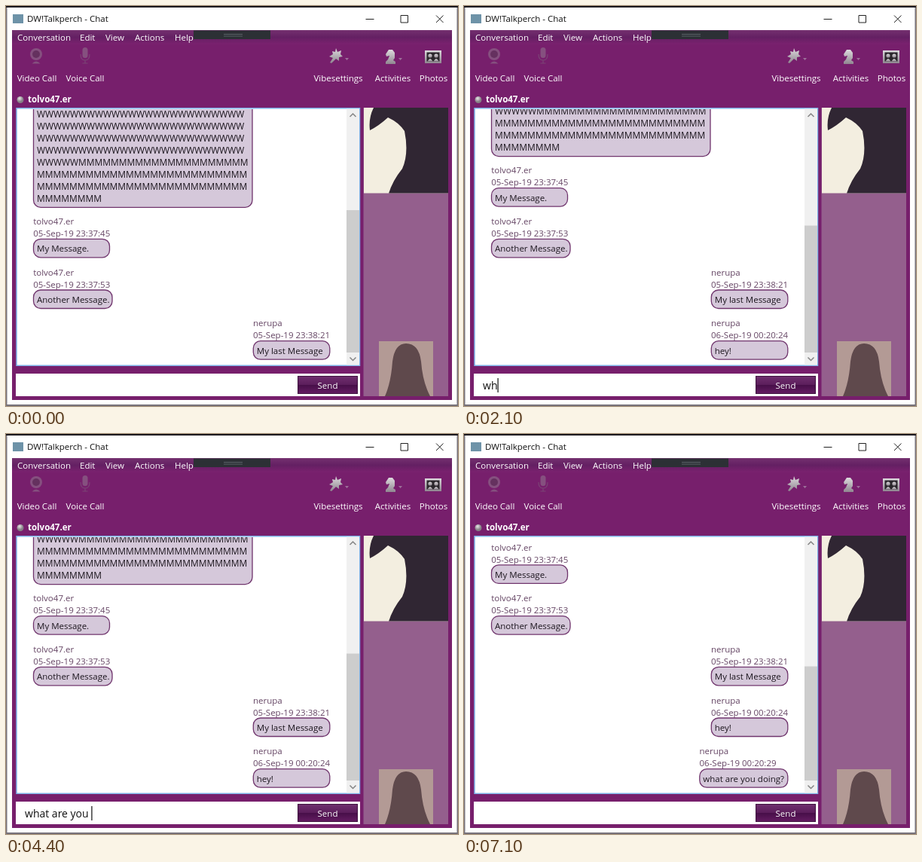
An HTML page for the animation above (7200 ms loop, 600 by 531 pixels).

```html
<!DOCTYPE html>
<html lang="en">
<head>
<meta charset="utf-8">
<title>Chat</title>
<style>
  html, body { margin: 0; width: 100%; height: 100%; overflow: hidden; }
  svg { display: block; width: 600px; height: 531px; font: 11.5px "Open Sans", "Noto Sans", sans-serif; }
  text { white-space: pre; }
  .title, .draft { fill: #111; }
  .light { fill: #fff; }
  .mid { text-anchor: middle; }
  .meta { fill: #654564; }
  .body { fill: #1c161e; }
  .long { font-size: 11.9px; }
  .draft { font-size: 14px; }
  .bubble { fill: #d5c8da; stroke: #70356d; stroke-width: 1.3; }
  .line { fill: none; stroke: #222; }
  .arrow { fill: none; stroke: #858585; stroke-width: 1.5; }
</style>
</head>
<body>
<svg viewBox="0 0 600 531">
  <defs>
    <linearGradient id="menu" x2="0" y2="1">
      <stop stop-color="#74306f"/>
      <stop offset=".5" stop-color="#642063"/>
      <stop offset="1" stop-color="#7b216f"/>
    </linearGradient>
    <linearGradient id="btn" x2="0" y2="1">
      <stop stop-color="#70306f"/>
      <stop offset=".48" stop-color="#5c1e5c"/>
      <stop offset=".52" stop-color="#480f49"/>
      <stop offset="1" stop-color="#641c62"/>
    </linearGradient>
    <linearGradient id="silver" x2="0" y2="1">
      <stop stop-color="#dedbde"/>
      <stop offset="1" stop-color="#8f8690"/>
    </linearGradient>
    <radialGradient id="orb" cx=".4" cy=".3">
      <stop stop-color="#e8e6e8"/>
      <stop offset="1" stop-color="#858085"/>
    </radialGradient>
    <clipPath id="view"><rect x="15" y="137" width="437" height="340"/></clipPath>
    <clipPath id="photo"><rect x="475" y="135" width="112" height="113.5"/></clipPath>
    <clipPath id="self"><rect x="495" y="445" width="72" height="73"/></clipPath>
  </defs>

  <!-- window -->
  <rect width="600" height="531" fill="#77727a"/>
  <rect width="600" height="2" fill="#1c191e"/>
  <rect x="1.5" y="2" width="597" height="527" fill="#fff"/>
  <rect x="9" y="11" width="14" height="12" fill="#6e93a8"/>
  <text class="title" x="28" y="21">DW!Talkperch - Chat</text>
  <path class="line" d="M477.500 17.500h11M524 12.500h9.500v9.500h-9.500zM571 12.500l9.500 9.500m0-9.500l-9.500 9.500"/>

  <!-- toolbar -->
  <rect x="8" y="32" width="584" height="491" fill="#771f6c"/>
  <rect x="8" y="32" width="584" height="19" fill="url(#menu)"/>
  <g id="labels" class="light"></g>
  <path fill="#2c3035" d="M249 32.500h102v11.500h-102z"/>
  <path stroke="#596066" d="M289 37.500h25m-25 2.500h25"/>

  <g fill="#85507f">
    <circle cx="40" cy="64" r="8"/>
    <path d="M34.500 76.500q5.500-6 11 0z"/>
    <circle cx="40" cy="64" r="5" fill="#65315f"/>
    <rect x="101.500" y="55" width="7" height="14" rx="3.500"/>
    <path d="M99 64q0 8 6 8t6-8m-6 8v4m-3.500 0h7" fill="none" stroke="#7b4475" stroke-width="1.200"/>
  </g>
  <g fill="url(#silver)">
    <path d="M438 56l2 5 5-2-1 5 3 3-5 1 0 5-4-3-6 6-2-1 4-6-5-2 5-3-1-4 4 1z"/>
    <path d="M504 77v-3l3-3 2-5-4 1-1-3 4-6 5 0 3 4 0 7-2 3 3 2v3z"/>
    <rect x="556" y="59" width="22" height="17"/>
    <rect x="558.500" y="61.500" width="17" height="12" fill="#2b272c"/>
    <circle cx="563" cy="66" r="2.600"/><circle cx="571" cy="66" r="2.600"/>
    <path d="M559.500 73.500q3.500-7 7 0zm8 0q3.500-7 7 0z"/>
    <path d="M450 69h5l-2.500 3zm71 0h5l-2.500 3z" fill="#9d719a"/>
  </g>
  <circle cx="19" cy="124.500" r="4.500" fill="url(#orb)"/>
  <text class="light" x="29" y="128" font-weight="700">tolvo47.er</text>

  <!-- conversation -->
  <rect x="14" y="135.750" width="455.500" height="341.500" fill="#fff" stroke="#7fb2e8" stroke-width="1.500"/>
  <g clip-path="url(#view)"><g id="log"></g></g>
  <rect x="452" y="136.500" width="17" height="340" fill="#f0f0f0"/>
  <rect id="thumb" x="452" width="17" fill="#cdcdcd"/>
  <path class="arrow" d="M456.500 147l4-4 4 4M456.500 466.500l4 4 4-4"/>

  <!-- side panel -->
  <rect x="474.500" y="135" width="112.500" height="383" fill="#945f8d"/>
  <g clip-path="url(#photo)">
    <rect x="475" y="135" width="112" height="114" fill="#f3eee0"/>
    <path fill="#302633" d="M488 135q-7 14-5 30 12-6 24-17 14 6 22 18 6 30-3 50-13 16-18 33h79v-114z"/>
  </g>
  <g clip-path="url(#self)">
    <rect x="495" y="445" width="72" height="73" fill="#b39a95"/>
    <path fill="#5f494c" d="M503 518q8-18 10-46 3-24 18-24 17 0 20 24 2 27 12 46z"/>
  </g>

  <!-- composer -->
  <rect x="13" y="488" width="457" height="30" fill="#fff"/>
  <rect x="387.500" y="491.500" width="79" height="23" fill="url(#btn)" stroke="#3f123f"/>
  <text class="light mid" x="427" y="507.500">Send</text>
  <text id="draft" class="draft" x="25" y="509"></text>
  <rect id="caret" y="494" width="1.200" height="19" fill="#111"/>
</svg>

<script>
const LOOP = 7200, TICK = 100, BLINK = 530, PITCH = 67.7;
const $ = id => document.getElementById(id);

function add(parent, tag, attrs, content = '') {
  const el = document.createElementNS('http://www.w3.org/2000/svg', tag);
  for (const key in attrs) el.setAttribute(key, attrs[key]);
  el.textContent = content;
  parent.append(el);
  return el;
}
const write = (parent, cls, x, y, str) => add(parent, 'text', { class: cls, x, y }, str);
const bubble = (parent, x, y, width, height) =>
  add(parent, 'rect', { class: 'bubble', x, y, width, height, rx: 9.5 });

const menu = { Conversation: 15, Edit: 98, View: 132, Actions: 171, Help: 224 };
const tools = { 'Video Call': 41, 'Voice Call': 105, Vibesettings: 441, Activities: 513.5, Photos: 567.5 };
for (const name in menu) write($('labels'), 'light', menu[name], 46, name);
for (const name in tools) write($('labels'), 'light mid', tools[name], 99.5, name);

// Long wrapped message at the top of the log
const rows = ['W'.repeat(25), 'W'.repeat(25), 'W'.repeat(25), 'W'.repeat(25),
  'W'.repeat(5) + 'M'.repeat(21), 'M'.repeat(26), 'M'.repeat(26), 'M'.repeat(8)];
bubble($('log'), 36.5, 100, 290.5, 167.3);
rows.forEach((row, i) => write($('log'), 'body long', 41, 148 + i * 15.95, row));

// x, bubble width, sender, time, text
const messages = [
  [36.5, 101, 'tolvo47.er', '05-Sep-19 23:37:45', 'My Message.'],
  [36.5, 104.5, 'tolvo47.er', '05-Sep-19 23:37:53', 'Another Message.'],
  [328.3, 101.5, 'nerupa', '05-Sep-19 23:38:21', 'My last Message'],
  [328.3, 101.5, 'nerupa', '06-Sep-19 00:20:24', 'hey!'],
  [312.8, 117, 'nerupa', '06-Sep-19 00:20:29', 'what are you doing?']
];
const items = messages.map(([x, width, who, when, text], i) => {
  const g = add($('log'), 'g', { transform: `translate(0 ${i * PITCH})` });
  write(g, 'meta', x - 0.3, 290, who);
  write(g, 'meta', x - 0.3, 306, when);
  bubble(g, x, 309.3, width, 24.5);
  write(g, 'body', x + 4.5, 326.3, text);
  return g;
});

const typing = [
  { start: 400, step: 200, send: 1500, text: 'hey!' },
  { start: 1850, step: 205, send: 6500, text: 'what are you doing?' }
];
const thumbTop = [271, 291.5, 308.5];

function stateAt(t) {
  let sent = 0, draft = '', last = typing[1].send - LOOP;
  for (const { start, step, send, text } of typing) {
    if (t >= send) {
      sent++;
      draft = '';
      last = send;
    } else if (t >= start) {
      const n = Math.min(text.length, Math.floor((t - start) / step) + 1);
      draft = text.slice(0, n);
      last = start + (n - 1) * step;
    }
  }
  return { sent, draft, caret: (t - last) % (2 * BLINK) < BLINK };
}

function render(now) {
  const t = Math.floor(now % LOOP / TICK) * TICK;
  const { sent, draft, caret } = stateAt(t);
  $('log').setAttribute('transform', `translate(0 ${-sent * PITCH})`);
  items.forEach((g, i) => g.setAttribute('visibility', i < 3 + sent ? 'visible' : 'hidden'));
  $('thumb').setAttribute('y', thumbTop[sent]);
  $('thumb').setAttribute('height', 460 - thumbTop[sent]);
  $('draft').textContent = draft;
  $('caret').setAttribute('x', 25 + (draft ? $('draft').getComputedTextLength() : 0));
  $('caret').setAttribute('visibility', caret ? 'visible' : 'hidden');
}

const begin = performance.now();
function loop() {
  render(performance.now() - begin);
  requestAnimationFrame(loop);
}
loop();
</script>
</body>
</html>
```
